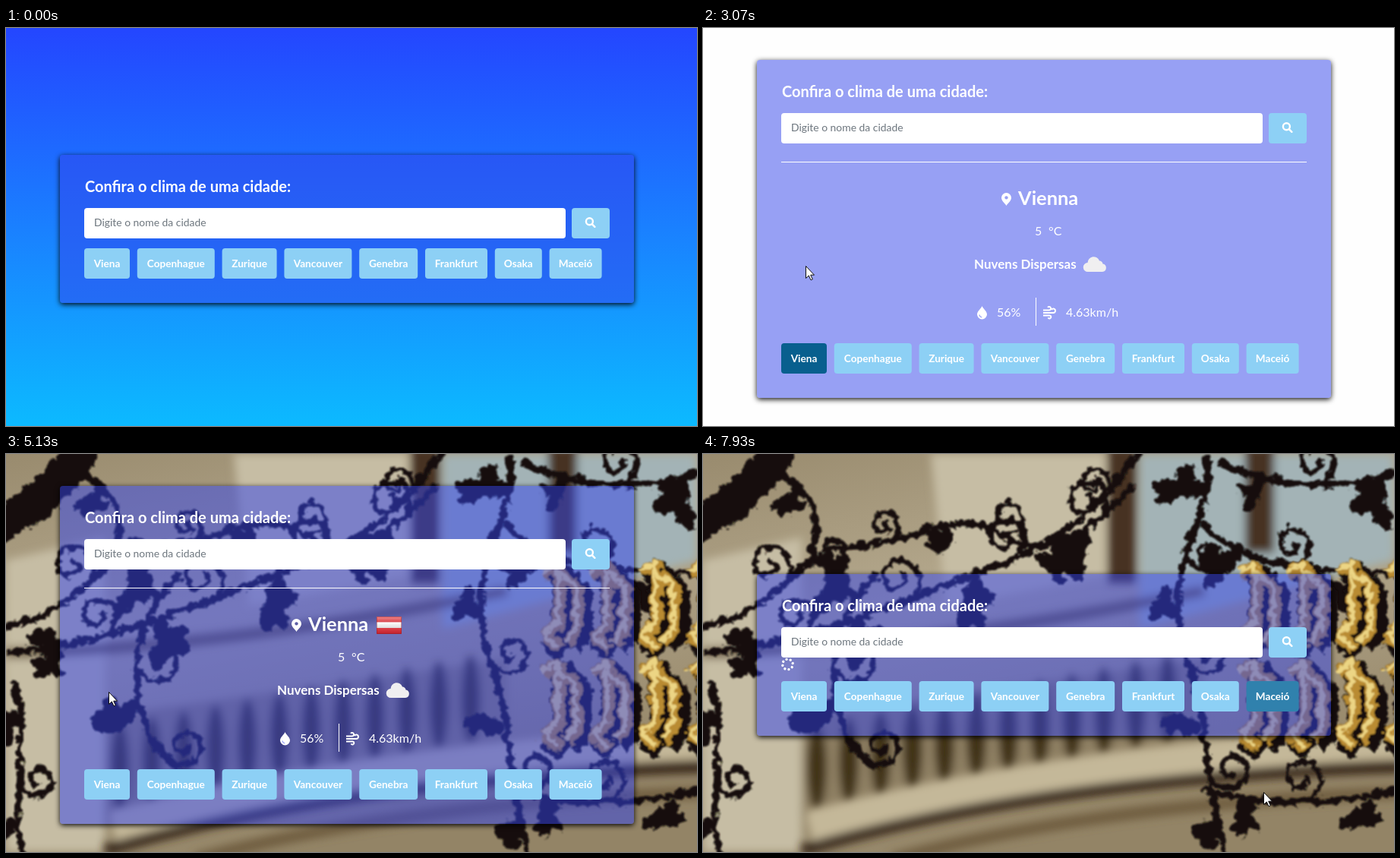
An HTML page for the animation above (8 s loop, 910 by 524 pixels).

```html
<!DOCTYPE html>
<html lang="pt">
<head>
<meta charset="utf-8">
<title>Clima</title>
<style>
html, body { margin: 0; width: 100%; height: 100%; overflow: hidden; background: #fefefe; }
#stage { position: absolute; left: 0; top: 0; width: 910px; height: 524px; overflow: hidden; }
#stage > * { position: absolute; left: 0; top: 0; width: 910px; height: 524px; }
#sky { background: linear-gradient(#2446ff, #1a80ff 50%, #0cbaff); }
#stage > #card { left: 71px; width: 756px; border-radius: 4px; background: rgba(51, 69, 235, .5); box-shadow: 0 2px 7px rgba(0, 0, 0, .95); }
text { font-family: Lato, "Open Sans", sans-serif; font-size: 16px; fill: #fff; white-space: pre; }
.b { font-weight: 700; }
</style>
</head>
<body>
<div id="stage">
  <div id="sky"></div>
  <svg id="photo" viewBox="0 0 910 524">
    <defs>
      <filter id="soft" x="-10%" y="-10%" width="120%" height="120%"><feGaussianBlur stdDeviation="6"/></filter>
      <filter id="rough">
        <feTurbulence baseFrequency=".06" numOctaves="2" seed="4"/>
        <feDisplacementMap in="SourceGraphic" scale="13" xChannelSelector="R" yChannelSelector="G"/>
        <feGaussianBlur stdDeviation=".8"/>
      </filter>
      <linearGradient id="stone" x2=".4" y2="1">
        <stop offset="0" stop-color="#998b6e"/><stop offset=".45" stop-color="#b7ab90"/><stop offset="1" stop-color="#938466"/>
      </linearGradient>
    </defs>
    <rect width="910" height="524" fill="url(#stone)"/>
    <g id="wall" filter="url(#soft)">
      <path fill="#c6bda4" d="M0 140L130 110V524H0zM300 0H530V160L320 200z"/>
      <path fill="#a3b3b6" d="M575 0H910V140L575 230z"/>
      <path fill="none" stroke="#463222" stroke-width="38" d="M552 -9V170M733 -9V130"/>
      <path fill="none" stroke="#6a583d" stroke-width="14" d="M0 262Q300 255 660 180"/>
      <path fill="#8f8064" d="M130 345L660 270V400L130 480z"/>
    </g>
    <g filter="url(#soft)">
      <path fill="none" stroke="#c4b899" stroke-width="40" d="M140 490Q480 400 920 380"/>
      <path fill="none" stroke="#3b2b1a" stroke-width="16" d="M130 522Q460 425 920 412"/>
      <path fill="none" stroke="#6f5d41" stroke-width="16" d="M250 534Q520 460 920 446"/>
    </g>
    <g id="iron" filter="url(#rough)" fill="#14100c" stroke="#14100c" stroke-linecap="round" stroke-width="9">
      <path fill="none" stroke-width="46" d="M-10 88C35 65 70 40 95 -10"/>
    </g>
    <g id="gilt" filter="url(#rough)" fill="none" stroke-linejoin="bevel"></g>
  </svg>
  <div id="card"></div>
  <svg viewBox="0 0 910 524">
    <defs>
      <linearGradient id="flag" x2="0" y2="1">
        <stop offset="0" stop-color="#f0878a"/><stop offset=".32" stop-color="#d8474e"/><stop offset=".33" stop-color="#fff"/>
        <stop offset=".66" stop-color="#dcdcdc"/><stop offset=".67" stop-color="#dc4048"/><stop offset="1" stop-color="#c0202c"/>
      </linearGradient>
    </defs>
    <g id="head">
      <text class="b" x="104" y="49" style="font-size:20px">Confira o clima de uma cidade:</text>
      <rect x="103" y="70" width="634" height="40" rx="4" fill="#fff"/>
      <text x="116" y="94" style="font-size:13.9px;fill:#6c757d">Digite o nome da cidade</text>
      <rect x="745" y="70" width="50" height="40" rx="4" fill="#8dd0f5"/>
      <g fill="none" stroke="#fff" stroke-width="2.4" stroke-linecap="round"><circle cx="768.4" cy="87.8" r="4.5"/><path d="M772 91.4L775.4 94.8"/></g>
    </g>
    <g id="spin" fill="#fff"></g>
    <g id="info" fill="#fff">
      <path d="M103 176h692v1H103zM438 355h1v37h-1z"/>
      <g id="city">
        <path fill-rule="evenodd" d="M399.5 234c-1.5-3-6.5-6-6.5-10.5a6.5 6.5 0 0 1 13 0c0 4.5-5 7.5-6.5 10.5zM399.5 221.2a2.2 2.2 0 1 0 .01 0z"/>
        <text class="b" x="415" y="233" style="font-size:25.4px">Vienna</text>
      </g>
      <g id="banner"><rect x="488" y="214" width="33" height="23" rx="1" fill="url(#flag)"/><path d="M488.5 236.5v-22h32v22z" fill="none" stroke="#8e1f2c" stroke-opacity=".45"/></g>
      <text x="437" y="273">5</text><text x="455" y="273">°C</text>
      <text class="b" x="357" y="317" style="font-size:17px">Nuvens Dispersas</text>
      <path fill="#f0eff0" d="M507 321a6 6 0 0 1-.5-12 8 8 0 0 1 15.5-2.5 5 5 0 0 1 4.5 4 5.3 5.3 0 0 1-.5 10.5z"/>
      <path d="M367.5 366c1 3 6.5 7 6.5 11a6.5 6.5 0 0 1-13 0c0-4 5.5-8 6.5-11z"/>
      <path d="M364 377.5q.4 3 3.3 3.3" fill="none" stroke="#99a2f5" stroke-width="1.3"/>
      <text x="387" y="380">56%</text>
      <path fill="none" stroke="#fff" stroke-width="2" d="M448 371.5h8a2.3 2.3 0 1 0-2-3.7M448 375h13.5a2.7 2.7 0 1 0-2.5-4M448 378.5h8.5a2 2 0 1 1-2 2.8"/>
      <text x="478" y="380">4.63km/h</text>
    </g>
    <g id="tail"></g>
    <g id="cursor" fill="#fff" stroke="#111" stroke-linejoin="round">
      <path id="arrow" d="M.5 .5V16.5L4.3 13 7 18.8 9.3 17.8 6.7 12.2H11.5z"/>
      <g id="hand"><path d="M-1.5 2a1.8 1.8 0 0 1 3.6 0v6c1-1 3-.8 3.4.5 1-.8 2.8-.5 3.2.7 1.2-.6 2.8 0 2.8 1.8v4.5c0 3-2 4.5-2 7h-9c0-2-1.5-3-2.8-5.2l-3-4.6c-1-2 1-3 2.3-1.8l1.5 1.6z"/><path d="M2.1 8v4M5.5 9v3.5M8.7 10v3" fill="none"/></g>
    </g>
  </svg>
</div>
<script>
const $ = id => document.getElementById(id);
const LOOP = 8000, FADE = 500;

function add(parent, tag, attrs, text) {
  const el = document.createElementNS('http://www.w3.org/2000/svg', tag);
  for (const k in attrs) el.setAttribute(k, attrs[k]);
  if (text) el.textContent = text;
  parent.appendChild(el);
  return el;
}
const show = (el, on) => { el.style.display = on ? '' : 'none'; };
const clamp = v => Math.min(1, Math.max(0, v));

let seed = 11;
const rand = (a, b) => a + (b - a) * (seed = seed * 16807 % 2147483647) / 2147483647;

// Backdrop: balusters, vines with curls and leaves, gilded bars
for (let i = 0; i < 12; i++) {
  add($('wall'), 'ellipse', { cx: 150 + i * 42, cy: 412 - i * 8, rx: 13, ry: 58, fill: '#403019' });
}

function curl(x, y, r, start, dir) {
  let d = '';
  for (let i = 0; i <= 40; i++) {
    const a = start + dir * i * 0.2, q = r * (1 - i / 52);
    d += `${i ? 'L' : 'M'}${x + q * Math.cos(a)} ${y + q * Math.sin(a)}`;
  }
  add($('iron'), 'path', { d, fill: 'none', 'stroke-width': 7 });
}

function leaf(x, y, r) {
  for (let i = 0; i < 4; i++) {
    add($('iron'), 'ellipse', { cx: r * 0.4, rx: r * 0.7, ry: r * 0.36, stroke: 'none', transform: `translate(${x} ${y}) rotate(${rand(0, 360)})` });
  }
}

function vine(d) {
  const path = add($('iron'), 'path', { d, fill: 'none' });
  const length = path.getTotalLength();
  for (let s = 50, side = 1; s < length; s += 75, side = -side) {
    const p = path.getPointAtLength(s), q = path.getPointAtLength(s + 1);
    const a = Math.atan2(q.y - p.y, q.x - p.x) + side * Math.PI / 2, r = rand(22, 34);
    const x = p.x + r * Math.cos(a), y = p.y + r * Math.sin(a);
    if (side > 0) leaf(x, y, r);
    else curl(x, y, r, a + Math.PI, side);
  }
}
['M85 15C135 40 158 80 140 118', 'M-5 222C90 215 110 125 200 118S330 65 385 100 490 122 560 40',
  'M0 258C110 250 200 215 300 175S480 125 570 -5', 'M225 160C150 210 150 365 222 406',
  'M662 0C670 80 595 150 632 260S650 390 685 524', 'M655 90C720 150 800 150 910 155',
  'M8 300C30 370 0 450 18 524', 'M660 440Q780 470 910 440', 'M680 10Q800 60 910 20'].forEach(vine);

let bars = '';
for (let i = 0; i < 8; i++) {
  bars += `M${705 + i % 4 * 64} ${i < 4 ? 155 : 285}l20 -14v80l-18 16 20 16m0 -98l22 18v54l-14 18`;
}
[['#120d08', 30, 5], ['#b98b31', 16, 0], ['#ecd584', 6, -2]].forEach(([stroke, width, shift]) => {
  add($('gilt'), 'path', { d: bars, stroke, 'stroke-width': width, transform: `translate(${shift} ${shift})` });
});

for (let i = 0; i < 8; i++) {
  add($('spin'), 'circle', { cx: 6.8, r: 1.7, transform: `rotate(${i * 45})` });
}

// City buttons, placed relative to the card's bottom edge
let edge = 103;
const buttons = Object.entries({ Viena: 60, Copenhague: 102, Zurique: 72, Vancouver: 89, Genebra: 77, Frankfurt: 82, Osaka: 62, Maceió: 69 })
  .map(([name, width]) => {
    const x = edge;
    edge += width + 9.8;
    const box = add($('tail'), 'rect', { x, y: -72, width, height: 40, rx: 4 });
    add($('tail'), 'text', { x: x + width / 2, y: -47, 'text-anchor': 'middle', class: 'b', style: 'font-size:13.6px' }, name);
    return { box, x, width, visits: [] };
  });

// The card is centred; its height depends on the phase
function phase(t) {
  const loading = (t >= 2000 && t < 3070) || t >= 7830;
  const full = t >= 3070 && !loading;
  const height = loading ? 213 : full ? 445 : 195;
  return { loading, full, height, top: 264.5 - height / 2, bottom: 264.5 + height / 2 };
}

// Two sweeps: one levels out towards the first button, one dips and rises to the last
function pointer(t) {
  if (t < 5000) {
    const u = 1 - clamp((t - 460) / 1340);
    return [135 + 317 * u, 313 + 112 * u ** 4];
  }
  const u = clamp((t - 6300) / 800);
  return [135 + 603 * u, 313 + 132 * u + 518 * u * (1 - u)];
}

function hovered(t) {
  if (t < 460) return undefined;
  const [x, y] = pointer(t), row = phase(t).bottom - 72;
  return buttons.find(b => x >= b.x && x <= b.x + b.width && y >= row && y <= row + 40);
}

// Note when the pointer enters and leaves each button
let last;
for (let t = 0; t < LOOP; t += 5) {
  const now = hovered(t);
  if (now && now !== last) now.visits.push({ on: t });
  if (now) now.visits[now.visits.length - 1].off = t + 5;
  last = now;
}

// cubic-bezier(.25, .1, .25, 1)
function ease(x) {
  const curve = (s, a, b) => 3 * s * (1 - s) * (1 - s) * a + 3 * s * s * (1 - s) * b + s * s * s;
  let lo = 0, hi = 1;
  for (let i = 0; i < 20; i++) {
    const mid = (lo + hi) / 2;
    if (curve(mid, 0.25, 0.25) < clamp(x)) lo = mid; else hi = mid;
  }
  return curve(lo, 0.1, 1);
}

const light = [141, 208, 245], dark = [8, 95, 142];
function shade(button, t) {
  const h = Math.max(0, ...button.visits.map(({ on, off }) =>
    ease((Math.min(t, off) - on) / FADE) * (1 - ease((t - off) / FADE))));
  return `rgb(${light.map((v, k) => Math.round(v + (dark[k] - v) * h))})`;
}

function render(t) {
  const { loading, full, height, top, bottom } = phase(t);

  show($('sky'), t < 3070);
  show($('photo'), t >= 5060);
  const partial = t < 5130;
  $('photo').style.clipPath = partial ? 'inset(0 0 375px 0)' : 'none';
  $('photo').style.filter = partial ? 'blur(1.6px)' : 'none';

  $('card').style.top = top + 'px';
  $('card').style.height = height + 'px';
  $('head').setAttribute('transform', `translate(0 ${top})`);
  $('tail').setAttribute('transform', `translate(0 ${bottom})`);
  buttons.forEach(b => b.box.setAttribute('fill', shade(b, t)));

  show($('spin'), loading);
  $('spin').setAttribute('transform', `translate(111.5 277) rotate(${(t < 3070 ? Math.min(t, 2070) : t) * 0.18})`);

  const flag = t >= 3670;
  show($('info'), full);
  show($('banner'), flag);
  $('city').setAttribute('transform', `translate(${flag ? -17 : 0} 0)`);

  const over = Boolean(hovered(t));
  show($('cursor'), t >= 460);
  show($('hand'), over);
  show($('arrow'), !over);
  $('cursor').setAttribute('transform', `translate(${pointer(t).join(' ')})`);
}

const start = performance.now();
function tick(now) {
  render(Math.max(0, now - start) % LOOP);
  requestAnimationFrame(tick);
}
render(0);
requestAnimationFrame(tick);
</script>
</body>
</html>
```
